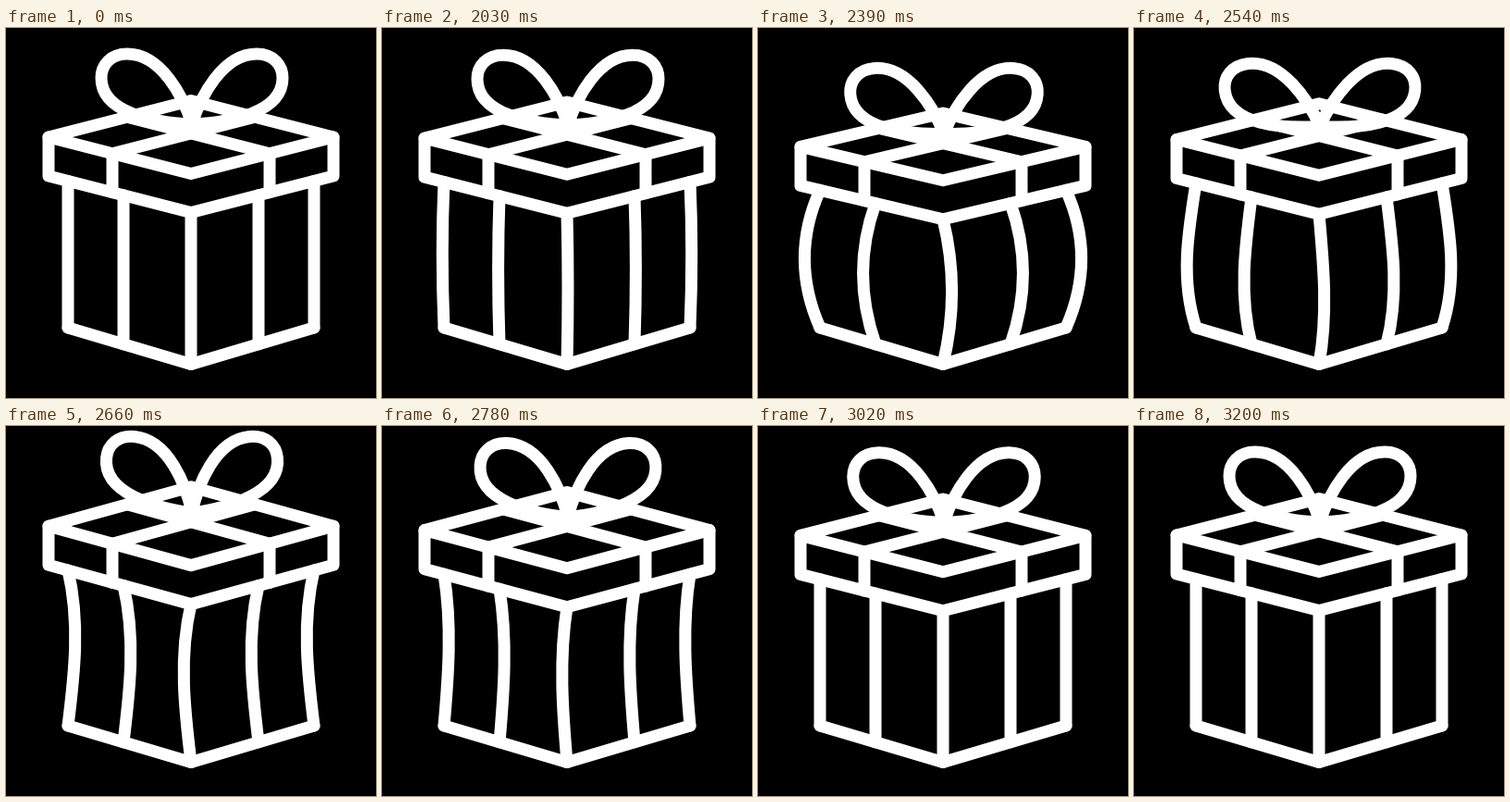
These frames come from a looping animation (400 by 400 pixels, 3.23 s). An HTML page with a canvas:

```html
<!DOCTYPE html>
<html lang="en">
<head>
<meta charset="utf-8">
<title>Gift box</title>
<style>
  html, body { margin: 0; height: 100%; overflow: hidden; background: #000; }
  canvas { display: block; width: 400px; height: 400px; }
</style>
</head>
<body>
<canvas id="stage" width="400" height="400"></canvas>
<script>
const ctx = document.getElementById('stage').getContext('2d');
const LOOP = 3230, START = 2030, STEP = 30;
const CENTER = 200, LID_HALF = 154, LID_DROP = 42;

const mix = (a, b, u) => a + (b - a) * u;
const easeOut = u => Math.sin(u * Math.PI / 2);
const easeInOut = u => (1 - Math.cos(u * Math.PI)) / 2;

// Press to 1, spring back to -dip, then settle in two smaller swings.
function spring(t, start, peak, dip, rebound) {
  if (t <= start) return 0;
  if (t < peak) return easeOut((t - start) / (peak - start));
  const swing = (from, to, t0, t1) => mix(from, to, easeInOut((t - t0) / (t1 - t0)));
  if (t < 2690) return swing(1, -dip, peak, 2690);
  if (t < 2900) return swing(-dip, rebound, 2690, 2900);
  if (t < 3110) return swing(rebound, -0.4 * rebound, 2900, 3110);
  return t < 3200 ? swing(-0.4 * rebound, 0, 3110, 3200) : 0;
}

function polyline(points, closed) {
  ctx.beginPath();
  points.forEach(([x, y]) => ctx.lineTo(x, y));
  if (closed) ctx.closePath();
  ctx.stroke();
}

// Depth runs from -1 at the back corner to 1 at the front; the back moves most.
const lidPoint = (lid, x, depth, drop = 0) =>
  [x, 118 + depth * 39.5 + drop + lid * (1 - 0.3 * depth)];

function drawBody(lid, upper, lower) {
  polyline([[67, 324], [CENTER, 363.5], [333, 324]]);
  for (const x of [67, 127, 200, 273, 333]) {
    const side = x < CENTER ? -1 : 1;
    const away = Math.abs(x - CENTER);
    const [, top] = lidPoint(lid, x, 1 - away / LID_HALF, LID_DROP);
    const bottom = 363.5 - away * 0.297;
    const bend = v => x + side * (v > 0 ? 10 + away * 0.055 : 8) * v * 4 / 3;
    ctx.beginPath();
    ctx.moveTo(x, top);
    ctx.bezierCurveTo(bend(upper), mix(top, bottom, 1 / 3),
      bend(lower), mix(top, bottom, 2 / 3), x, bottom);
    ctx.stroke();
  }
}

function drawLid(lid) {
  const p = (x, depth, drop) => lidPoint(lid, CENTER + x, depth, drop);
  const front = p(0, 1), back = p(0, -1);
  const left = p(-LID_HALF, 0), right = p(LID_HALF, 0);
  polyline([left, back, right, front], true);
  polyline([left, p(-LID_HALF, 0, LID_DROP), p(0, 1, LID_DROP),
    p(LID_HALF, 0, LID_DROP), right]);
  for (const side of [-1, 1]) {
    polyline([p(side * 85, 0.45, LID_DROP), p(side * 85, 0.45), p(-side * 69, -0.55)]);
  }
}

function drawBow(lid, tilt) {
  for (const side of [-1, 1]) {
    ctx.save();
    ctx.translate(201, 104 + lid);
    ctx.scale(side, 1);
    ctx.rotate(tilt);
    ctx.beginPath();
    ctx.moveTo(0, 0);
    ctx.bezierCurveTo(9, -29, 33, -76, 70, -76);
    ctx.bezierCurveTo(88, -76, 98, -64, 98, -50);
    ctx.bezierCurveTo(98, -12, 41, -2, 0, 0);
    ctx.stroke();
    ctx.restore();
  }
}

function draw(now) {
  const t = now % LOOP;
  const time = t < START ? 0 : START + Math.floor((t - START) / STEP) * STEP;
  const lid = 10.5 * spring(time, 2000, 2430, 1, 0.25);
  const upper = spring(time, 2000, 2460, 1.35, 0);
  const lower = spring(time, 2000, 2490, 0.75, 0);
  const tilt = 0.11 * spring(time, 2280, 2530, 1.1, 0.35);
  ctx.fillStyle = '#000';
  ctx.fillRect(0, 0, 400, 400);
  ctx.strokeStyle = '#fff';
  ctx.lineWidth = 13;
  ctx.lineCap = ctx.lineJoin = 'round';
  drawBody(lid, upper, lower);
  drawLid(lid);
  drawBow(lid, tilt);
}

const begin = performance.now();
function tick() {
  draw(performance.now() - begin);
  requestAnimationFrame(tick);
}
tick();
</script>
</body>
</html>
```
